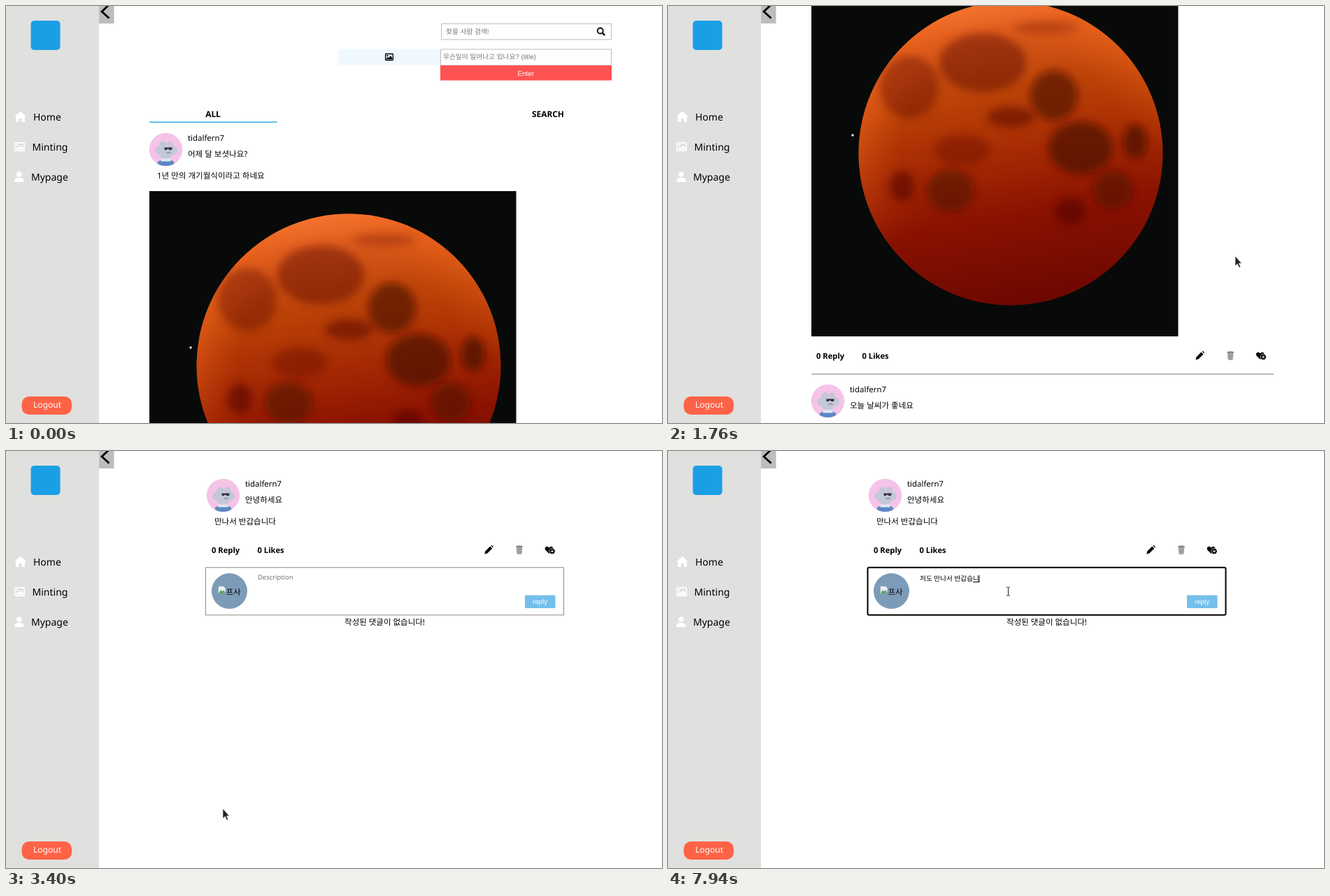
Write an HTML page that moves like this. It is 938x597 px and loops after 8 s.

```html
<!DOCTYPE html>
<html lang="ko">
<head>
<meta charset="utf-8">
<title>Feed</title>
<style>
html, body { margin: 0; height: 100%; overflow: hidden; background: #fff; }
svg { display: block; width: 938px; height: 597px; }
text { font-family: "Noto Sans", "Noto Sans CJK KR", sans-serif; text-rendering: geometricPrecision; white-space: pre; }
.ui { font-family: "Liberation Sans", "Noto Sans CJK KR", sans-serif; }
</style>
</head>
<body>
<svg viewBox="0 0 938 597">
  <defs>
    <linearGradient id="glow" x1=".42" y1="0" x2=".58" y2="1">
      <stop offset="0" stop-color="#fb8140"/>
      <stop offset=".1" stop-color="#dc5a1c"/>
      <stop offset=".3" stop-color="#bb4207"/>
      <stop offset=".5" stop-color="#a52a03"/>
      <stop offset=".7" stop-color="#8a1201"/>
      <stop offset="1" stop-color="#6c0700"/>
    </linearGradient>
    <radialGradient id="rim">
      <stop offset=".72" stop-color="#e8601a" stop-opacity="0"/>
      <stop offset="1" stop-color="#f0661c" stop-opacity=".55"/>
    </radialGradient>
    <linearGradient id="fade" x2=".35" y2="1">
      <stop offset=".35" stop-color="#fff"/>
      <stop offset=".75" stop-color="#000"/>
    </linearGradient>
    <mask id="lit"><circle cx="490" cy="515" r="218" fill="url(#fade)"/></mask>
    <clipPath id="disc"><circle cx="490" cy="515" r="217.5"/></clipPath>
    <filter id="soft"><feGaussianBlur stdDeviation="6"/></filter>

    <g id="avatar">
      <circle r="23.7" fill="#f5c3e8"/>
      <path d="M-12 18Q0 9 12 18L11 21Q0 26-11 21Z" fill="#5b88c4"/>
      <path d="M-7 13H7V17H-7Z" fill="#dfe5f2"/>
      <g fill="#c3c8d6">
        <circle cx="-9" cy="1" r="6"/><circle cx="10" cy="1" r="6.5"/>
        <circle cx="-4" cy="-7" r="5"/><circle cx="6" cy="-7" r="5"/>
        <ellipse cy="5" rx="10" ry="8"/>
      </g>
      <path d="M-2-3H9V0L6 1 3-1 0 1-2 0Z" fill="#35333d"/>
      <path d="M1 5Q4 3 7 5" fill="none" stroke="#666" />
    </g>
    <g id="tools">
      <path d="M-6 6-5 2 2-5 5-2-2 5ZM3-6 4.5-6.5 6.5-4.5 6-3Z"/>
      <g transform="translate(43.7)">
        <path d="M-4.5-4H4.5L3.4 6.5H-3.4Z" fill="#b4b6ba"/>
        <path d="M-2.4-3-1.7 6M0-3V6M2.4-3 1.7 6M-4 0H4M-3.8 3H3.8" stroke="#85878c" stroke-width=".7"/>
        <ellipse cy="-4.7" rx="5" ry="1.6" fill="#85878c"/>
      </g>
      <g transform="translate(87.3)">
        <path d="M-1 5.5-6 .5C-9-4-3.5-7-1-3 1.5-7 7-4 4 .5Z"/>
        <circle cx="3.4" cy="2" r="4.2" stroke="#fff" stroke-width=".7"/>
        <path d="M1.4 2H5.4M3.4 0V4" stroke="#fff" stroke-width=".9"/>
      </g>
    </g>
    <g id="picture">
      <path fill-rule="evenodd" d="M-5.5-6H5.5Q7-6 7-4.5V4.5Q7 6 5.5 6H-5.5Q-7 6-7 4.5V-4.5Q-7-6-5.5-6ZM-5.5-4.5V4.5H5.5V-4.5Z"/>
      <circle cx="-3" cy="-2.2" r="1.4"/>
      <path d="M-5 3.8V2.5L-2.5 0-1 1.5 2-2 5 1.5V3.8Z"/>
    </g>
  </defs>

  <g id="feed">
    <g fill="#fff" stroke="#bdbdbd">
      <path d="M622.5 25.5H865.5V48H622.5Z"/>
      <path d="M621.5 62H865.5V85H621.5Z"/>
    </g>
    <circle cx="849.7" cy="35.5" r="4" fill="none" stroke="#000" stroke-width="1.8"/>
    <path d="M852.6 38.4 856.2 42" stroke="#000" stroke-width="2.2"/>
    <path d="M475.5 61.5H621V84.5H475.5Z" fill="#f0f8ff"/>
    <use href="#picture" transform="translate(548 73) scale(.86)"/>
    <path d="M621 85H866V106.5H621Z" fill="#ff5252"/>
    <path d="M205 166.2H387.5" stroke="#35ade6" stroke-width="1.5"/>
    <path d="M205 265H729.5V777H205Z" fill="#070a09"/>
    <circle cx="490" cy="515" r="217.5" fill="url(#glow)"/>
    <circle cx="490" cy="515" r="217.5" fill="url(#rim)" mask="url(#lit)"/>
    <g clip-path="url(#disc)"><g id="maria" filter="url(#soft)"/></g>
    <circle cx="264" cy="489" r="1.7" fill="#eee"/>
  </g>

  <g id="detail">
    <rect id="box" x="285.5" y="166.8" width="512" height="68" fill="#fff"/>
    <circle cx="319.5" cy="200.5" r="25.5" fill="#7c9bb8"/>
    <path d="M303.5 193.5H311L314 196.5V201L309 204.5H303.5Z" fill="#e8f0f8" stroke="#8fa0ae" stroke-width=".7"/>
    <path d="M304 204 307 199 309 201 312 199V202L309 204.5Z" fill="#52a352"/>
    <path d="M742 206.5H785.5V225H742Z" fill="#74bfeb"/>
    <path id="caret" stroke="#000" fill="none"/>
  </g>

  <g id="side">
    <path d="M0 0H133V597H0Z" fill="#e0e0de"/>
    <path d="M133 0H154.5V25H133Z" fill="#bdbdbd"/>
    <path d="M147.5-2 137 8 147.5 17.5" fill="none" stroke="#000" stroke-width="2.8"/>
    <rect x="35.5" y="21" width="42" height="42" rx="5" fill="#1a9fe6"/>
    <rect x="22.5" y="559" width="71.5" height="26" rx="10.5" fill="#ff6347"/>
    <g fill="#fff">
      <path d="M20.5 150.5 29 158.5H27V166H22.5V161H18.5V166H14V158.5H12Z"/>
      <use href="#picture" transform="translate(19.5 201.5) scale(1.08)"/>
      <circle cx="18.8" cy="241" r="3.8"/>
      <path d="M12 252Q12 246 16.5 246H21Q25.5 246 25.5 252Z"/>
    </g>
  </g>

  <path id="arrow" d="M0 0V14.2L3.2 11.2 5.6 16.5 7.7 15.6 5.4 10.4H9.3Z" fill="#222" stroke="#fff" stroke-width=".6"/>
  <path id="beam" d="M-2.5-6H-.7L0-5.3.7-6H2.5M0-5.3V5.3M-2.5 6H-.7L0 5.3.7 6H2.5" fill="none" stroke="#222"/>
</svg>
<script>
const $ = id => document.getElementById(id);

function add(parent, tag, attrs) {
  const el = document.createElementNS('http://www.w3.org/2000/svg', tag);
  for (const key in attrs) el.setAttribute(key, attrs[key]);
  return parent.appendChild(el);
}

// y is the vertical middle of the capitals
function label(parent, x, y, size, words, attrs = {}) {
  const el = add(parent, 'text', { x, y: y + size * .36, 'font-size': size, ...attrs });
  el.textContent = words;
  return el;
}

function post(parent, x, y, title, body, toolX, rowY = y + 78) {
  add(parent, 'use', { href: '#avatar', transform: `translate(${x + 23.5} ${y})` });
  label(parent, x + 55, y - 17, 11.4, 'tidalfern7');
  label(parent, x + 55, y + 6, 11.55, title, { 'font-weight': 500 });
  label(parent, x + 11, y + 37.5, 11.55, body);
  label(parent, x + 7, rowY, 11.2, '0 Reply', { 'font-weight': 600 });
  label(parent, x + 72.5, rowY, 11.2, '0 Likes', { 'font-weight': 600 });
  add(parent, 'use', { href: '#tools', transform: `translate(${toolX} ${rowY})` });
}

const feed = $('feed'), detail = $('detail'), side = $('side');
const hint = { class: 'ui', fill: '#757575' };
const white = { class: 'ui', fill: '#fff', 'text-anchor': 'middle' };
const heading = { 'font-weight': 700, 'text-anchor': 'middle' };

// dark patches on the moon: x, y, rx, ry, opacity
[[450, 385, 62, 42, .4], [345, 420, 42, 45, .35], [552, 432, 34, 36, .65],
 [590, 507, 46, 38, .7], [668, 498, 17, 25, .75], [636, 567, 28, 28, .55],
 [575, 598, 22, 20, .5], [404, 568, 34, 30, .55], [334, 562, 18, 22, .5],
 [490, 463, 34, 15, .45], [420, 510, 40, 22, .3], [540, 335, 45, 9, .25]
].forEach(([cx, cy, rx, ry, opacity]) =>
  add($('maria'), 'ellipse', { cx, cy, rx, ry, opacity, fill: '#4d0d02' }));

label(feed, 629, 36.5, 9.7, '찾을 사람 검색!', hint);
label(feed, 625, 73, 9.7, '무슨일이 일어나고 있나요? (title)', hint);
label(feed, 743.3, 96, 9.9, 'Enter', white);
label(feed, 296, 155, 11.9, 'ALL', heading);
label(feed, 775, 155, 11.9, 'SEARCH', heading);
post(feed, 205, 205.5, '어제 달 보셧나요?', '1년 만의 개기월식이라고 하네요', 760.5, 804.5);
post(feed, 205, 869.5, '오늘 날씨가 좋네요', '좋은 하루되세요!', 760.5);
post(feed, 205, 1012.5, '안녕하세요', '만나서 반갑습니다', 760.5);
for (const y of [831, 973]) add(feed, 'path', { d: `M205 ${y}H866`, stroke: '#777' });

post(detail, 287, 63.5, '안녕하세요', '만나서 반갑습니다', 690.3);
label(detail, 314.5, 201.5, 11.5, '프사');
label(detail, 763.5, 216, 9.7, 'reply', white);
label(detail, 541.5, 244.5, 11.5, '작성된 댓글이 없습니다!', { 'text-anchor': 'middle' });
const placeholder = label(detail, 360, 181, 9.4, 'Description', { fill: '#757575' });
const typed = label(detail, 360, 183, 9.66, '');

label(side, 39, 159, 14, 'Home');
label(side, 37.5, 202, 14, 'Minting');
label(side, 36, 245, 14, 'Mypage');
label(side, 59, 570.5, 12, 'Logout', { fill: '#fff', 'text-anchor': 'middle' });

// Stepped tracks: each entry holds from its time until the next one
const scrolls = [[0, 0], [1010, 35], [1130, 62], [1260, 102], [1390, 147], [1510, 193],
  [1640, 248], [1760, 304], [1890, 360], [2010, 415], [2130, 465], [2260, 488], [2380, 500]];
const pointer = [[0, -50, 0], [130, 918, 581], [250, 882, 500], [380, 838, 412], [500, 808, 361],
  [640, 804, 352], [750, 812, 360], [1390, 811, 358], [2650, 775, 378], [2780, 675, 420],
  [2900, 550, 462], [3030, 425, 492], [3160, 340, 506], [3280, 310, 512],
  [3650, 390, 396], [3790, 448, 285], [3910, 480, 214], [4030, 486.5, 201]];
const typing = [[0, ''], [4790, 'ㅈ'], [4910, '저'], [5040, '젇'], [5170, '저도'], [5290, '저도 ㅁ'],
  [5420, '저도 마'], [5540, '저도 만'], [5810, '저도 만나'], [6060, '저도 만낫'], [6190, '저도 만나서'],
  [6310, '저도 만나서 '], [6430, '저도 만나서 ㅂ'], [6680, '저도 만나서 반'], [6810, '저도 만나서 반가'],
  [7180, '저도 만나서 반갑'], [7300, '저도 만나서 반갑ㅅ'], [7430, '저도 만나서 반갑스'],
  [7560, '저도 만나서 반갑습'], [7810, '저도 만나서 반갑습ㄴ'], [7940, '저도 만나서 반갑습니']];
const PAGE = 3400, BEAM = 3910, FOCUS = 4030, LOOP = 8000;

const at = (track, t) => track.findLast(step => step[0] <= t);
const show = (el, on) => el.setAttribute('visibility', on ? 'visible' : 'hidden');

function draw() {
  const t = performance.now() % LOOP;
  const focused = t >= FOCUS, beam = t >= BEAM;
  show(feed, t < PAGE);
  show(detail, t >= PAGE);
  feed.setAttribute('transform', `translate(0 ${-at(scrolls, t)[1]})`);

  const [, x, y] = at(pointer, t);
  const cursor = $(beam ? 'beam' : 'arrow');
  show($('arrow'), !beam);
  show($('beam'), beam);
  cursor.setAttribute('transform', `translate(${x} ${y})`);

  const box = $('box');
  box.setAttribute('stroke', focused ? '#000' : '#8a8a8a');
  box.setAttribute('stroke-width', focused ? 2 : 1);
  box.setAttribute('rx', focused ? 2 : 0);

  const words = at(typing, t)[1];
  placeholder.style.display = words ? 'none' : '';
  if (typed.textContent !== words) typed.textContent = words;
  const end = words ? 360 + typed.getComputedTextLength() : 0;
  const underline = words.endsWith(' ') ? '' : `M${end - 8.9} 187.5H${end}`;
  $('caret').setAttribute('d', words ? `M${end} 178V188${underline}` : '');
  requestAnimationFrame(draw);
}
draw();
</script>
</body>
</html>
```
